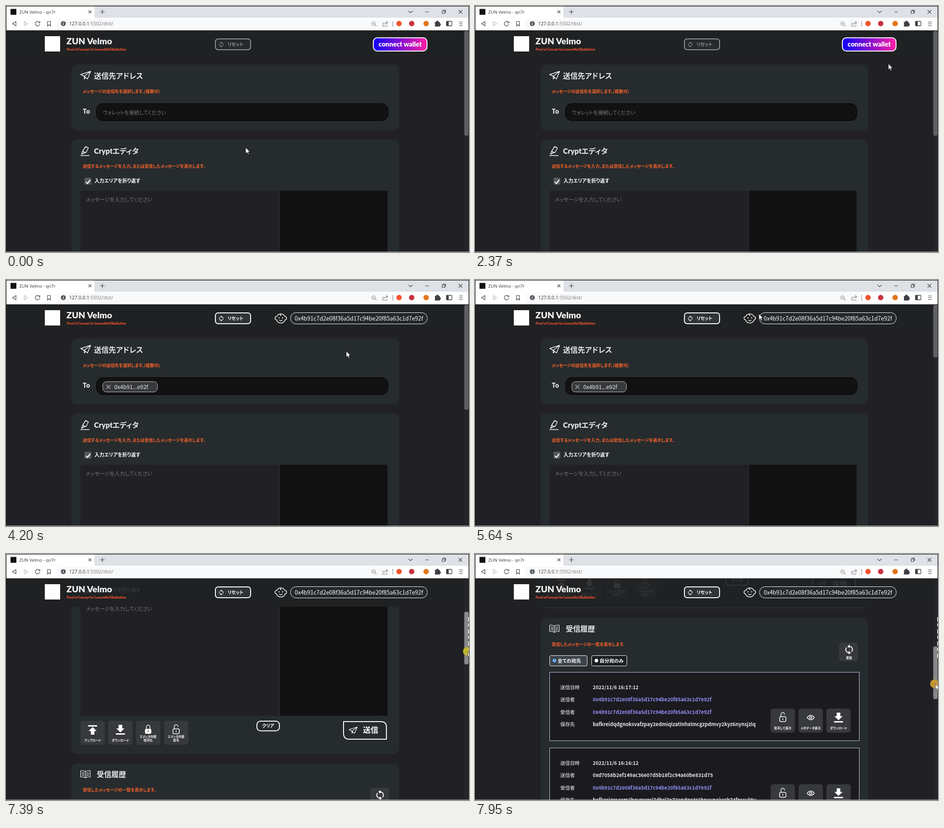
These frames come from a looping animation (1026x546 px, 8000 ms). An HTML page:

```html
<!DOCTYPE html>
<html lang="ja">
<head>
<meta charset="utf-8">
<style>
  html, body { margin: 0; width: 100%; height: 100%; overflow: hidden; background: #212125; }
  svg { display: block; }
  text { font: 700 10px 'Noto Sans CJK JP', 'Noto Sans CJK', sans-serif; font-feature-settings: 'palt'; fill: #fff; white-space: pre; }
  .brand { font-family: Lato, 'Noto Sans CJK JP', sans-serif; font-weight: 900; }
  .ui { font-family: 'Open Sans', sans-serif; font-weight: 400; }
  .medium { font-weight: 500; }
  .light { font-weight: 400; }
  .line { fill: none; stroke: #fff; stroke-width: 1.5; stroke-linejoin: round; stroke-linecap: round; }
  .tool { fill: none; stroke: #3c3f43; stroke-width: 1.2; }
</style>
</head>
<body>
<svg id="stage" width="1026" height="546" viewBox="0 0 1026 546"></svg>
<script>
const ORANGE = '#ff642b', CARD = '#262b2d', BUTTON = '#37393c', LINK = '#9290f5';
const myAddress = '0x4b91c7d2e08f36a5d17c94be20f85a63c1d7e92f';
const otherAddress = '0xd7058b2ef149ac36e07d5b18f2c94a60be831d75';

const text = (x, y, size, str, fill = '#fff', cls = '', anchor = 'start') =>
  `<text x="${x}" y="${y}" class="${cls}" text-anchor="${anchor}" style="font-size:${size}px;fill:${fill}">${str}</text>`;
const rect = (x, y, w, h, fill, r = 0, extra = '') =>
  `<rect x="${x}" y="${y}" width="${w}" height="${h}" rx="${r}" fill="${fill}" ${extra}/>`;
const path = (d, cls = 'line', extra = '') => `<path class="${cls}" d="${d}" ${extra}/>`;
const dot = (x, y, r, fill, extra = '') => `<circle cx="${x}" cy="${y}" r="${r}" fill="${fill}" ${extra}/>`;
const at = (x, y, body, scale = 1) => `<g transform="translate(${x} ${y}) scale(${scale})">${body}</g>`;
const outline = (color, width = 1) => `stroke="${color}" stroke-width="${width}"`;

// Icons centred on the origin, except plane, pen and book (top left).
const lock = shackle => path(shackle) + rect(-7, -2, 14, 11, 'none', 3, outline('#fff', 1.5));
const halfTurn = path('M0-7A7 7 0 0 1 6 4', 'line', 'style="stroke-width:2"') +
  '<path fill="#fff" d="M-4-7L1-11V-3Z"/>';
const icons = {
  plane: path('M0 7L22 0L15 17L8 11ZM8 11L22 0M8 11V17L11 14'),
  pen: path('M5 10L11 1L17 4L12 14L6 13ZM5 10L2 18L10 14M0 21H19'),
  book: path('M10.5 3Q6 0 0 1V15Q7 14 10.5 17Q14 14 21 15V1Q15 0 10.5 3V17M3 5L8 6M3 8L8 9M3 11L8 12M18 5L13 6M18 8L13 9M18 11L13 12', 'line', 'style="stroke-width:1.2"'),
  up: '<path fill="#fff" d="M-10-10H10V-7H-10ZM0-6L9 3H4V11H-4V3H-9Z"/>',
  down: '<path fill="#fff" d="M-10 8H10V11H-10ZM0 6L9-3H4V-11H-4V-3H-9Z"/>',
  closed: path('M-4-2V-6A4 4 0 0 1 4-6V-2') + rect(-7, -2, 14, 11, '#fff', 3) + path('M0 2V5', 'line', 'style="stroke:#37393c"'),
  open: lock('M-4-2V-7A4 4 0 0 1 4-7') + path('M0 2V5'),
  eye: path('M-8 0Q0-10 8 0Q0 10-8 0Z') + dot(0, 0, 2.5, 'none', outline('#fff', 1.5)),
  refresh: `${halfTurn}<g transform="rotate(180)">${halfTurn}</g>`
};

const tile = (x, y, icon, ...labels) => rect(x, y, 54, 53.5, BUTTON, 6) +
  at(x + 27, y + 20, icons[icon]) +
  labels.map((s, i) => text(x + 27, y + 46 - (labels.length - 1 - i) * 8, 6.7, s, '#fff', '', 'middle')).join('');

const card = (y, h, icon, iconY, titleX, title, titleY, note, noteY) =>
  rect(145, y, 726, h, CARD, 12) + at(165.5, iconY, icons[icon]) +
  text(titleX, titleY, 16.3, title, '#e8e8ea', 'brand') + text(170, noteY, 9.3, note, ORANGE);

const entry = (y, time, sender, senderColor, cid) => {
  const rows = [['送信日時', time, '#e8e8ea'], ['送信者', sender, senderColor],
    ['受信者', myAddress, LINK], ['保存先', cid, '#e8e8ea']];
  return rect(165.5, y + .5, 686, 152, '#1b1a1f', 0, outline('#c8caec')) +
    rows.map(([label, value, color], i) => text(189, y + 38 + i * 27.3, 10.7, label, '#b9b9bd') +
      text(261, y + 38 + i * 27.3, 10.9, value, color)).join('') +
    tile(655, y + 81, 'open', '復号して表示') + tile(717, y + 81, 'eye', 'メタデータ表示') +
    tile(778.5, y + 81, 'down', 'ダウンロード');
};

const page = card(130, 146, 'plane', 145, 195, '送信先アドレス', 161, 'メッセージの送信先を選択します。(複数可)', 193) +
  text(170, 239, 14, 'To') + rect(200.5, 216.5, 646, 38, '#121212', 14, outline('#000')) +
  `<g id="hint">${text(215, 241, 11.4, 'ウォレットを接続してください', '#77777a', 'light')}</g>
  <g id="chip">${rect(214.5, 225.5, 121, 23, BUTTON, 8, outline('#c9c9cb'))}
    ${path('M223 233L231 241M231 233L223 241', 'line', 'style="stroke:#aaa"')}
    ${text(240, 241.5, 12.2, `${myAddress.slice(0, 6)}...${myAddress.slice(-4)}`, '#eee', 'medium')}</g>` +
  card(296, 456, 'pen', 311, 195, 'Cryptエディタ', 328, '送信するメッセージを入力、または受信したメッセージを表示します。', 359) +
  rect(174, 381, 15, 15.5, '#59595c', 2) + path('M177.5 391L180.5 394L186 386.5', 'line', 'style="stroke-width:2.2"') +
  text(196, 392, 10.8, '入力エリアを折り返す') +
  rect(165, 410, 440, 257, '#212125') + rect(607, 410, 238.5, 257, '#121212') +
  text(177, 434, 11.6, 'メッセージを入力してください', '#77777a', 'light') +
  tile(165, 678, 'up', 'アップロード') + tile(226.5, 678, 'down', 'ダウンロード') +
  tile(288, 678, 'closed', 'エディタ内容', '暗号化') + tile(350, 678, 'open', 'エディタ内容', '復号') +
  rect(556, 679, 50, 21.5, CARD, 8, outline('#fff', 2)) + text(581, 693, 10, 'クリア', '#fff', '', 'middle') +
  path('M752 680H830Q843 680 843 692V719H760Q748 719 748 706V680Z', 'line', 'style="stroke-width:2"') +
  at(760, 692, icons.plane, .83) + text(791, 705, 17, '送信') +
  card(773, 900, 'book', 788, 201, '受信履歴', 803, '受信したメッセージの一覧を表示します。', 835) +
  rect(807, 827, 42, 42, BUTTON, 6) + at(829, 843, icons.refresh) + text(829, 864, 6.7, '更新', '#fff', '', 'middle') +
  rect(165.5, 856.5, 83, 23, '#3d434b', 3, outline('#fff')) + rect(258.5, 856.5, 78, 23, '#1b1f21', 3, outline('#fff')) +
  dot(176, 867.5, 3.7, '#fff', outline('#1675d8', 1.3)) + dot(176, 867.5, 2, '#1675d8') + dot(269, 867.5, 4, '#fff') +
  text(183, 872, 10.7, '全ての宛先') + text(276, 872, 10.7, '自分宛のみ') +
  entry(893, '2022/11/6 16:17:12', myAddress, LINK, 'bafkreidqdgnoksvafzpay2edmiqlzatlnhxlmcgzpdmvy2kyz6nynsjzlq') +
  entry(1061, '2022/11/6 16:16:12', otherAddress, '#e8e8ea', 'bafkreigracxm2hovpwrsi7dhri7o72xpdpz4r2hpcuneiwsh74frecuktu');

const header = rect(0, 54, 1015, 63, '#1f2224', 0, 'opacity=".91"') +
  rect(86, 67, 34, 34, '#fff') +
  text(134, 84.5, 19.5, 'ZUN Velmo', '#f4f4f4', 'brand') +
  text(134.5, 98.5, 6.6, 'Proof of Concept for LumaroNet5Buildathon', '#f4522c', 'brand') +
  `<g id="reset">${rect(464, 73, 78, 24, '#303436', 6, outline('#fff', 2))}
    ${at(477, 85.5, icons.refresh, .58)}${text(508.5, 88.8, 10, 'リセット', '#fff', '', 'middle')}</g>
  <g id="connect">${rect(814, 70.5, 119, 29.5, 'url(#neon)', 9, outline('#fff', 2))}
    ${text(873.5, 90, 14.5, 'connect wallet', '#fff', 'brand', 'middle')}</g>
  <g id="account">${rect(630.5, 72.5, 303, 25, '#22272a', 12, outline('#fff'))}
    ${text(782, 90, 12.5, myAddress, '#fff', 'medium', 'middle')}
    ${at(609, 85, path('M-9-4A10 10 0 0 1 9-4C14-4 14 3 9.5 3.5A10 10 0 0 1-9.5 3.5C-14 3-14-4-9-4ZM-3 4Q0 7 3 4M0-10Q-3-7 1-6') +
      dot(-4, -1, 1.3, '#fff') + dot(4, -1, 1.3, '#fff'))}</g>`;

const browser = rect(0, 0, 1026, 26, '#dee1e6') + rect(0, 0, 196, 26, '#fff') + rect(0, 26, 1026, 28, '#fff') +
  rect(113, 29, 740, 21, '#f8f9fa', 4) +
  rect(10, 6.5, 13, 13, '#111') + text(29.5, 17, 9.7, 'ZUN Velmo - qn7r', '#333', 'ui') +
  path('M183 10L189 16M189 10L183 16M208.5 13H218.5M213.5 8V18M892 11L896.5 15L901 11M929 13H937M966.5 11H972.5V16.5H966.5ZM968.5 11V9H974V14.5H972.5M1003 9L1011 17M1011 9L1003 17', 'tool') +
  path('M22 34.5V44L14.5 39.2ZM74 36A5 5 0 1 0 75 40M75 34V37.5H71.5M92 34.5H98.5V44.5L95.2 41.5L92 44.5Z', 'tool') +
  path('M40.5 34.5V44L48 39.2Z', 'tool', 'style="stroke:#b5b7ba"') +
  dot(127, 39, 5.5, '#55585c') + rect(126.3, 38, 1.4, 4, '#fff') + rect(126.3, 35.5, 1.4, 1.4, '#fff') +
  `<text class="ui" x="140" y="43" style="font-size:10.6px;fill:#333">127.0.0.1<tspan fill="#777" style="fill:#777">:5502/dist/</tspan></text>` +
  path('M818 42L821 45M812 39H817M838 38H835V45H844V42M838 42Q838 37 845 37M842 34L846 37L842 40M857 33V46', 'tool', 'style="stroke:#85888c"') +
  dot(814.5, 39, 4, 'none', outline('#85888c')) +
  dot(871, 39, 6, '#f2552c') + dot(899, 39, 6, '#c8323f') + dot(931, 39, 6, '#e2761b') +
  path('M951 36H954V35A2 2 0 0 1 958 35V36H961V39A2 2 0 0 1 961 43V45H951V42A2 2 0 0 0 951 39Z', 'tool', 'style="fill:#3c3f43"') +
  rect(976, 34, 12, 10, 'none', 1, outline('#3c3f43', 1.3)) + rect(976, 34, 5, 10, '#3c3f43') +
  path('M1004 35.5H1012M1004 39.5H1012M1004 43.5H1012', 'tool') +
  path('M0 .5H1026M.5 0V546M1025.5 0V54', 'tool', 'style="stroke:#111;stroke-width:1"') +
  rect(0, 545, 1026, 1, '#999');

const stage = document.getElementById('stage');
stage.innerHTML = `<defs>
  <linearGradient id="neon"><stop offset=".06" stop-color="#1c00f5"/><stop offset="1" stop-color="#fb1fa5"/></linearGradient>
  <linearGradient id="fade" x2="0" y2="1"><stop stop-color="#777"/><stop offset=".4" stop-color="#fff"/></linearGradient>
  </defs>
  ${rect(0, 0, 1026, 546, '#212125')}<g id="page">${page}</g>
  <g id="loading">${rect(0, 54, 1015, 492, '#000', 0, 'opacity=".7"')}
    ${dot(508, 230, 26.5, 'none', 'id="spinner" stroke="url(#fade)" stroke-width="2.5"')}</g>
  ${header}${rect(1015, 54, 11, 491, '#242528')}<rect id="thumb" x="1015.5" width="9.5" rx="4"/>
  ${browser}
  <path id="trail" fill="none" stroke="#fff" stroke-width="2" stroke-dasharray="10 4 7 6"/>
  <g id="pointer"><circle id="press" cx="-2" r="9.5" opacity=".9"/>
    <path id="arrow" fill="#fff" stroke="#000" stroke-width=".8" d="M0 0V13.5L3.2 10.6L5.3 15.5L7.5 14.5L5.4 9.8H9.5Z"/>
    <path id="hand" fill="#fff" stroke="#000" stroke-width=".8" d="M0 2Q2 0 3.5 2V8Q5 6.5 6 8Q8 7 8.5 8.7Q11 8 11 10V14Q11 17 9 20H1.5Q0 16-3.5 13Q-4.5 10.5-2 11L0 12.5Z"/></g>`;
const el = Object.fromEntries([...stage.querySelectorAll('[id]')].map(e => [e.id, e]));

const pointerKeys = [[0, 531, 314], [850, 531, 314], [1200, 700, 205], [1660, 872, 70], [1800, 805, 55], [1930, 798, 110],
  [2120, 850, 170], [2370, 916, 128], [2510, 912, 78], [2680, 850, 60], [2850, 818, 90], [3040, 862, 142],
  [3240, 895, 105], [3420, 880, 85], [3700, 870, 95], [4200, 754, 158], [4870, 760, 164], [5050, 774, 175],
  [5360, 606, 125], [5500, 605, 66], [5710, 640, 80], [6100, 810, 105], [6470, 1011, 148], [6540, 1020, 134],
  [7000, 1020, 134], [7390, 1024, 216], [7740, 1021, 280], [7950, 1020, 288]];
const scrollKeys = [[0, 0], [7000, 0], [7390, 307], [7740, 600], [7940, 631]];

function sample(keys, t, channel) {
  const next = keys.findIndex(k => k[0] > t);
  if (next < 0) return keys.at(-1)[channel];
  const a = keys[next - 1], b = keys[next];
  return a[channel] + (b[channel] - a[channel]) * (t - a[0]) / (b[0] - a[0]);
}
const clamp = v => Math.max(0, Math.min(1, v));
const show = (node, visible) => node.setAttribute('display', visible ? 'inline' : 'none');

function draw(t) {
  const x = sample(pointerKeys, t, 1), y = sample(pointerKeys, t, 2);
  const scroll = Math.round(sample(scrollKeys, t, 1));
  const connected = t >= 3420, filled = t >= 3980;

  show(el.connect, !connected);
  show(el.account, connected);
  show(el.hint, !filled);
  show(el.chip, filled);
  el.reset.setAttribute('opacity', connected ? .65 + .35 * clamp((t - 3420) / 280) : .5);
  show(el.loading, connected && t < 4180);
  el.loading.setAttribute('opacity', clamp((4180 - t) / 200));
  el.spinner.setAttribute('transform', `rotate(${(t - 3420) * .36} 508 230)`);

  el.page.setAttribute('transform', `translate(0 ${-scroll})`);
  el.thumb.setAttribute('y', 55 + Math.round(scroll * 150 / 631));
  el.thumb.setAttribute('height', t < 4470 ? 233 : 117);
  el.thumb.setAttribute('fill', t < 6540 ? '#5f6062' : '#88888a');

  const hovering = t < 4000 && x > 813 && x < 934 && y > 70 && y < 101;
  show(el.pointer, t < 4270 || t >= 4870);
  el.pointer.setAttribute('transform', `translate(${Math.round(x)} ${Math.round(y)})`);
  show(el.hand, hovering);
  show(el.arrow, !hovering);
  show(el.press, t >= 6970);
  el.press.setAttribute('fill', t < 7880 ? '#c5b82a' : '#cf9d32');
  show(el.trail, t >= 7110);
  el.trail.setAttribute('d', `M1025.5 140V${Math.max(140, Math.min(y, 230))}`);
}

function tick() {
  draw(performance.now() % 8000);
  requestAnimationFrame(tick);
}
tick();
</script>
</body>
</html>
```
